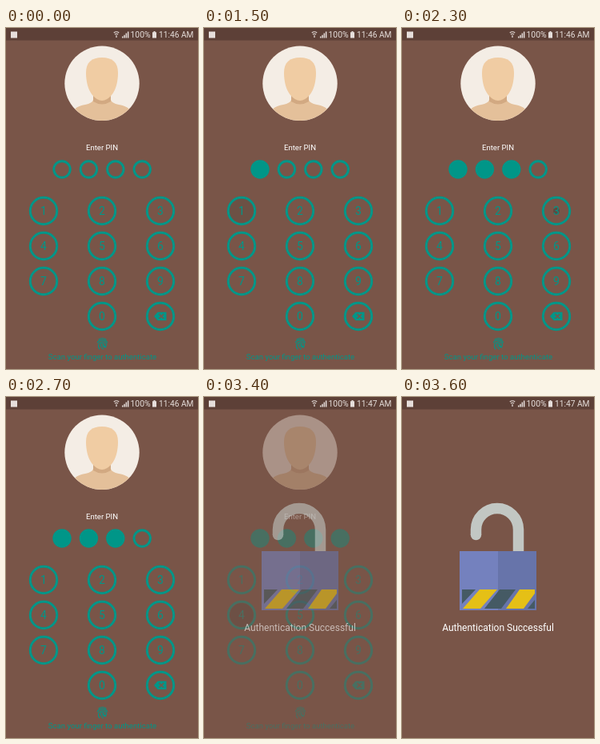
Animation, 240 px wide and 427 px high, one loop 3700 ms. Source, as an HTML page:

```html
<!DOCTYPE html>
<html lang="en">
<head>
<meta charset="utf-8">
<title>PIN unlock</title>
<style>
html, body { margin: 0; height: 100%; overflow: hidden; background: #795548; }
svg { display: block; width: 100vw; height: 100vh; font-family: Roboto, sans-serif; }
.ring { fill: none; stroke: #009688; stroke-width: 3; }
.teal { fill: #009688; }
.mid { text-anchor: middle; }
.line { fill: none; stroke: #009688; stroke-width: 1.1; stroke-linecap: round; }
</style>
</head>
<body>
<svg viewBox="0 0 240 427">
  <clipPath id="round"><circle cx="120" cy="69.3" r="46.7"/></clipPath>
  <rect width="240" height="427" fill="#795548"/>

  <g id="pin">
    <g clip-path="url(#round)">
      <rect x="73" y="22" width="94" height="95" fill="#f4ede5"/>
      <path d="M78 118C80 103 88 98 99 96Q108 94 109 90V80H131V90Q132 94 141 96C152 98 160 103 162 118Z" fill="#e4c09a"/>
      <path d="M109 82H131V92Q120 99 109 92Z" fill="#d2a982"/>
      <path d="M100 56C100 43 107 37 120 37S140 43 140 56C140 68 137 78 132 84Q126 91 120 91T108 84C103 78 100 68 100 56Z" fill="#f0cca3"/>
    </g>
    <text class="mid" x="120" y="153.3" font-size="9.6" fill="#fff">Enter PIN</text>
    <g id="dots"></g>
    <g id="keys"></g>
    <path class="teal" d="M185 361L189.5 355.8H200.5V366.2H189.5Z"/>
    <path d="M191.5 358.3L197 363.8M197 358.3L191.5 363.8" stroke="#795548" stroke-width="1.5"/>
    <g class="line">
      <path d="M116 390Q120.5 387 125 390M114.5 394C116 389.500 125 389.500 126.500 394M115.500 399C114 391.500 126 390.500 125.500 397.500Q124 400 122.500 398C123 394 118 393 118 397Q118.500 400 121.500 402M120.500 396.500Q121 400 125 400M115.500 399Q116 401 117 402"/>
    </g>
    <text class="teal mid" x="120.5" y="415" font-size="9.6">Scan your finger to authenticate</text>
  </g>

  <g id="lock">
    <path d="M145.500 193.500V166A26.500 26.500 0 0 0 92.500 166V172.500" fill="none" stroke="#c2c7c3" stroke-width="13.500"/>
    <circle cx="92.500" cy="172.500" r="6.750" fill="#c2c7c3"/>
    <rect x="72" y="193" width="96" height="74" fill="#7481be"/>
    <rect x="120" y="193" width="48" height="74" fill="#6774aa"/>
    <path d="M75 241H92L75 259ZM122 241H142L124 265H103ZM166 254V265H157Z" fill="#455a64"/>
    <path d="M97 241H119L98 265H76ZM147 241H166V246L152 265H130Z" fill="#e5c016"/>
    <text class="mid" x="120" y="293" font-size="12" fill="#fff">Authentication Successful</text>
  </g>

  <rect width="240" height="15.500" fill="#5d4037"/>
  <g fill="#e6dedb">
    <rect x="6" y="4.500" width="8" height="8"/>
    <path d="M145 12.500V10.500H146.500V12.500ZM147.300 12.500V8.700H148.800V12.500ZM149.600 12.500V6.600H151.100V12.500ZM151.900 12.500V4.500H153.400V12.500Z"/>
    <path d="M183 5.300H184.500V4H186.500V5.300H188V12.500H183Z"/>
    <path d="M134.800 6Q138 3.500 141.200 6M136 8Q138 6.500 140 8M138 9V12" fill="none" stroke="#e6dedb" stroke-width="1.200"/>
    <text x="155.500" y="12.300" font-size="10.400">100%</text>
    <text id="clock" x="191" y="12.300" font-size="10.200"></text>
  </g>
</svg>
<script>
const LOOP = 3700;
const $ = id => document.getElementById(id);
const fillTimes = [1200, 1800, 2300, 3000];
const pressTimes = [1200, 1700, 2300, 3200];

function add(parent, tag, attrs, text = "") {
  const el = document.createElementNS("http://www.w3.org/2000/svg", tag);
  for (const name in attrs) el.setAttribute(name, attrs[name]);
  el.textContent = text;
  return parent.appendChild(el);
}

const dots = fillTimes.map((_, i) =>
  add($("dots"), "circle", { cx: 70 + i * 33.4, cy: 177, r: 10.2, class: "ring", "stroke-width": 2.6 }));

const ripples = [];
[..."123456789 0<"].forEach((key, i) => {
  if (key === " ") return;
  const x = 47 + i % 3 * 73, y = 229 + Math.floor(i / 3) * 44;
  if (i < 4) ripples.push(add($("keys"), "circle", { cx: x, cy: y, fill: "#263636" }));
  add($("keys"), "circle", { cx: x, cy: y, r: 16.7, class: "ring" });
  if (key !== "<") add($("keys"), "text", { x, y: y + 5, "font-size": 14, class: "teal mid" }, key);
});

function draw(now) {
  const t = Math.floor(now % LOOP / 100) * 100;
  dots.forEach((dot, i) => dot.style.fill = t >= fillTimes[i] ? "#009688" : "none");
  ripples.forEach((ripple, i) => {
    const age = t - pressTimes[i];
    ripple.setAttribute("r", Math.max(0, Math.min(16, 4 + age * .055)));
    ripple.setAttribute("opacity", age < 0 ? 0 : Math.max(0, .5 - Math.abs(age - 100) * .0018));
  });
  const fade = t < 3300 ? 0 : [.04, .6, .93, 1][(t - 3300) / 100];
  $("pin").setAttribute("opacity", 1 - fade);
  $("lock").setAttribute("opacity", fade);
  $("clock").textContent = t < 3200 ? "11:46 AM" : "11:47 AM";
}

const start = performance.now();
function tick() {
  draw(performance.now() - start);
  requestAnimationFrame(tick);
}
tick();
</script>
</body>
</html>
```
